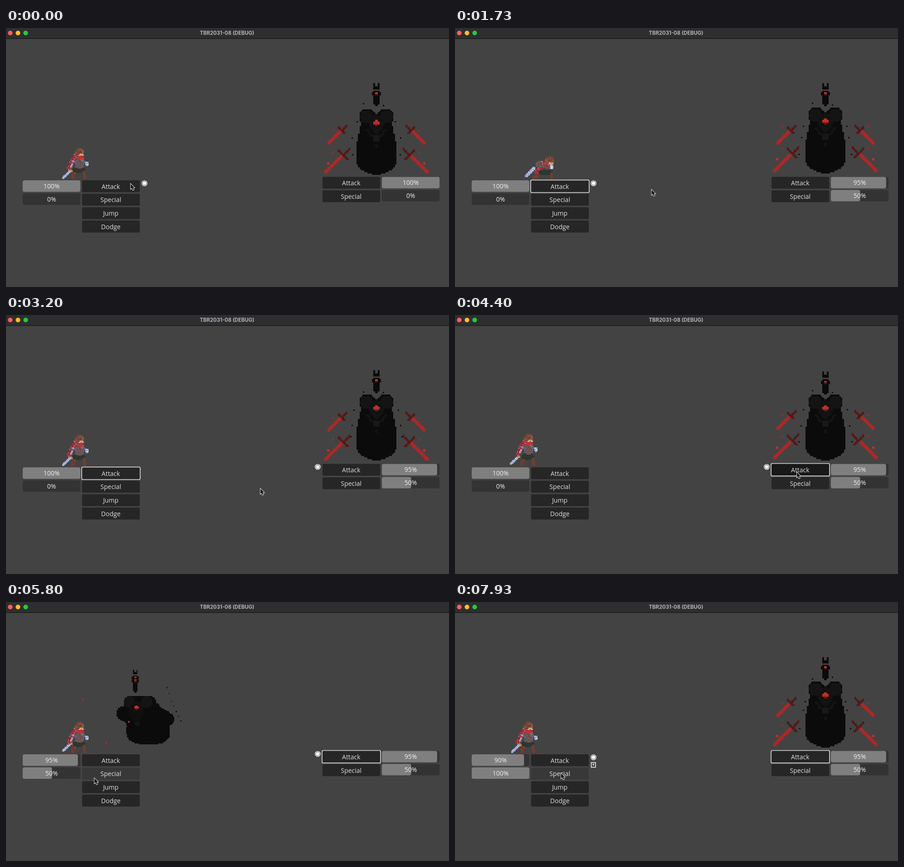
Recreate the animation shown at these times as an HTML page with a canvas. Size 977 by 573 pixels, loop 8 s.

```html
<!DOCTYPE html>
<html lang="en">
<head>
<meta charset="utf-8">
<title>Battle</title>
<style>
  html, body { margin: 0; width: 100%; height: 100%; overflow: hidden; background: #434343; }
  canvas { display: block; }
</style>
</head>
<body>
<canvas id="stage" width="977" height="573"></canvas>
<script>
const ctx = document.getElementById('stage').getContext('2d');
const LOOP = 8000, BIG = 3.39, SMALL = 2.54, AXIS = 817;
const BLACK = '#0b0b0b', COAL = '#141414', RED = '#ae2727', DARK_RED = '#551717', BRIGHT = '#c2302c';

const clamp = v => Math.max(0, Math.min(1, v));
const span = (t, from, to) => clamp((t - from) / (to - from));
const noise = (a, b = 0) => {
  const v = Math.sin(a * 127.1 + b * 311.7) * 43758.5453;
  return v - Math.floor(v);
};

// A small pixel canvas. A colour may list several tones, which are then mixed by noise.
class Sprite {
  constructor(x, y, cols, rows, px, paint) {
    Object.assign(this, { x, y, cols, rows, px });
    this.img = document.createElement('canvas');
    this.img.width = cols;
    this.img.height = rows;
    this.g = this.img.getContext('2d');
    paint(this);
  }
  fill(color, test) {
    const tones = color.split(' ');
    for (let r = 0; r < this.rows; r++) for (let c = 0; c < this.cols; c++) {
      if (!test(c + .5, r + .5)) continue;
      this.g.fillStyle = tones[Math.floor(noise(c, r) * tones.length)];
      this.g.fillRect(c, r, 1, 1);
    }
  }
  box(color, c, r, w = 1, h = 1) {
    this.fill(color, (x, y) => x > c && x < c + w && y > r && y < r + h);
  }
  disc(color, cx, cy, rx, ry = rx, power = 2) {
    this.fill(color, (x, y) => Math.abs((x - cx) / rx) ** power + Math.abs((y - cy) / ry) ** power < 1);
  }
  line(color, x0, y0, x1, y1, radius) {
    const dx = x1 - x0, dy = y1 - y0, len = dx * dx + dy * dy;
    this.fill(color, (x, y) => {
      const u = clamp(((x - x0) * dx + (y - y0) * dy) / len);
      return Math.hypot(x - x0 - u * dx, y - y0 - u * dy) < radius;
    });
  }
  draw(dx = 0, dy = 0) {
    ctx.imageSmoothingEnabled = false;
    ctx.drawImage(this.img, this.x + dx, this.y + dy, this.cols * this.px, this.rows * this.px);
  }
}

const bossPart = paint => new Sprite(AXIS - 35 * BIG, 122, 70, 60, BIG, paint);

function gem(s, center, row) {
  for (let i = 0; i < 4; i++) {
    const half = i === 1 || i === 2 ? 2 : 1;
    s.box([BRIGHT, BRIGHT, RED, DARK_RED][i], center - half, row + i, half * 2);
  }
}

// The same mask serves both poses: eared crown, narrow head, red visor.
function mask(s, c) {
  s.box(BLACK, c, 0, 1, 4);
  s.box(BLACK, c + 3, 0, 1, 4);
  s.box(BLACK, c, 2, 4, 2);
  s.box(BLACK, c, 5, 4, 9);
  s.box(BLACK, c - 1, 6, 6, 2);
  s.box(BLACK, c + 1, 14, 2);
  s.box(BRIGHT, c + 1, 6, 2);
  s.box(DARK_RED, c + 1, 7, 2);
}

const bossHead = bossPart(s => mask(s, 33));

const bossBody = bossPart(s => {
  s.fill(BLACK, (x, y) => {
    const belly = y > 50 ? Math.sqrt(Math.max(0, 1 - ((y - 50) / 9.8) ** 2)) : 1;
    return y > 20 && Math.abs(x - 35) < Math.min(13, 9 + (y - 20) * .2) * belly;
  });
  for (const side of [-1, 1]) {
    s.disc(BLACK, 35 + side * 6, 22, 5.3, 5.2);
    s.disc(COAL, 35 + side * 6.5, 22, 4.2, 4.2);
    s.line(COAL, 35 + side * 6, 30, 35 + side * 3, 35, .7);
  }
  s.fill(COAL + ' #101010', (x, y) => Math.abs(x - 35) / 5.5 + Math.abs(y - 27) / 8 < 1);
  s.disc('#181818', 35, 36, 2.3);
  s.box(COAL, 34, 40, 2, 2);
  gem(s, 35, 24);
});

// Diagonal swords on both sides: grip, crossguard, blade.
function swords(s, col, row, length) {
  const guard = Math.round(length / 4), arm = guard - 1;
  const pair = (color, c, r) => [c, 69 - c].forEach(x => s.box(color, x, r));
  for (let i = 0; i < length; i++) {
    const color = i > guard ? RED : DARK_RED;
    pair(color, col + i, row + i);
    pair(color, col + i, row + i + (i < length - 1 ? 1 : 0));
    if (i > guard) pair(color, col + i, row + i - 1);
  }
  for (let k = -arm; k <= arm; k++) {
    pair(DARK_RED, col + guard + k, row + guard - k);
    if (k < arm) pair(DARK_RED, col + guard + k + 1, row + guard - k);
  }
}
const upperSwords = bossPart(s => swords(s, 54, 27, 13));
const lowerSwords = bossPart(s => swords(s, 52, 42, 17));

const lungingBoss = new Sprite(241.9, 150, 60, 66, SMALL, s => {
  mask(s, 15);
  s.g.drawImage(s.img, 13, 5, 7, 10, 13, 7, 7, 13);
  s.line(BLACK, 13, 29, 29, 29, 6.5);
  s.line(BLACK, 7, 38, 26, 42, 6.5);
  s.line(BLACK, 32, 36, 45, 43, 6);
  s.disc(BLACK, 25, 42, 17);
  s.disc(BLACK, 28.3, 53, 19, 12, 2.8);
  s.disc(COAL, 12, 28, 5);
  s.disc(COAL, 27, 28, 5);
  s.disc('#111111 #0e0e0e', 18, 36, 6, 9);
  s.disc(COAL, 18.5, 47, 2.5);
  gem(s, 18, 31);
  for (let i = 0; i < 7; i++) s.box(BLACK, 44 + i * 2, 15 + Math.floor(i * 4.6 + noise(i) * 4));
});

const HAIR = '#74483a #8a5845 #6c4034', CAPE = '#a5303c #a5303c #8c2a38 #b8636c', STEEL = '#b4c0e2 #98a4d0 #aab6de',
      LEATHER = '#74402f #6a3a2c', CLOTH = '#6a6068 #75493c #5b5564', TROUSERS = '#2a322f #303834',
      HAND = '#aebed9 #dce8fa #8f9fbf', SKIN = '#dba27c';

const heroPart = paint => new Sprite(121.4, 262.9, 48, 28, SMALL, paint);

function face(s, x, y) {
  s.disc(HAIR, x, y, 4.2, 3.9);
  s.disc(SKIN, x + 1.7, y + 2.5, 2.2, 1.6);
  s.box('#3c8290', Math.floor(x + 1.5), Math.floor(y + 2));
}

const heroTop = heroPart(s => {
  s.line(CAPE, 12.5, 8, 9, 14, 1.9);
  s.line(CAPE, 9, 14, 6.5, 19, 1.7);
  s.line('#77707f #c9ccd8 #5b5564', 11, 13, 9, 17, 1);
  s.disc(CLOTH, 16, 14.5, 4.5, 4.8);
  s.line('#6f6f86 #5d5d72', 18, 12, 21.5, 14, 1.3);
  face(s, 16, 5);
  s.line('#b02f36 #c03a34', 15, 9.6, 18.5, 10, 1.5);
  s.disc(HAND, 22.6, 14.7, 1.9);
});
const heroLegs = heroPart(s => {
  s.disc(TROUSERS, 15.5, 20, 5.5, 3);
  s.line(LEATHER, 11.3, 23, 10.5, 27, 1.5);
  s.line(LEATHER, 19.8, 22.5, 20.8, 27, 1.4);
});
const heroSword = heroPart(s => {
  s.line(STEEL, 1.8, 27, 8.5, 20.5, 1.1);
  s.line('#b78542', 7.5, 19.5, 9.5, 21, .7);
});
const heroSlash = heroPart(s => s.line(STEEL, 24, 15, 33, 8, 1.2));

// Leaning pose, shared by the run out and the run home.
const heroLean = new Sprite(154.3, 284, 32, 20, SMALL, s => {
  s.line(STEEL, 1, 17.5, 8.5, 10, 1.1);
  s.line(CAPE, 10, 14, 17, 6, 2.1);
  s.line(CLOTH, 12, 7, 21, 8, 2.8);
  s.line(CAPE, 15, 5, 20, 8, 1.5);
  s.line(TROUSERS, 14, 14, 22, 14, 2);
  s.line(LEATHER, 12, 16, 8.5, 18.5, 1.5);
  s.line(LEATHER, 23, 15, 23, 18.5, 1.4);
  face(s, 21.5, 3.7);
  s.disc(HAND, 23.5, 9.7, 1.7);
});

function cell(color, x, y, size) {
  ctx.fillStyle = color;
  ctx.fillRect(Math.round(x - size / 2), Math.round(y - size / 2), Math.round(size), Math.round(size));
}

function idleBoss(t, dx) {
  const step = Math.floor((t >= 6900 ? t - 6380 : t) / 100) % 7, cx = AXIS + dx;
  const up = (first, last) => step >= first && step <= last ? -BIG : 0;
  upperSwords.draw(dx, up(1, 2));
  lowerSwords.draw(dx, up(1, 3));
  bossBody.draw(dx, up(1, 5));
  bossHead.draw(dx, -up(2, 2));
  for (const side of [-1, 1]) {
    for (let i = 0; i < 3; i++) {
      cell(BLACK, cx + side * (42 + i * 5 + noise(step, i) * 8), 208 + i * 30 + noise(i, step) * 16, BIG);
    }
    cell(BLACK, cx + side * 22 - 6, 166 + noise(step, side) * 7, BIG);
    cell(RED, cx + side * 95, 228 - step % 4 * 3, BIG);
    cell(RED, cx + side * 95, 276 - step % 4 * 3, BIG);
    cell(BRIGHT, cx + side * 106, 300 - step % 4 * 3, BIG * 1.5);
  }
}

function drawBoss(t) {
  if (t >= 5450 && t < 6950) return lungingBoss.draw();
  const away = t < 6000 ? span(t, 4980, 5450) : 1 - span(t, 6950, 7450);
  idleBoss(t, -530 * away ** 2);
}

function drawHero(t) {
  const reach = t < 1300 ? span(t, 150, 700) : 1 - span(t, 1300, 1850);
  const dx = 520 * reach ** 2;
  if (reach > 0 && reach < 1) return heroLean.draw(dx - 25);
  const step = Math.floor(t / 100) % 8;
  const lift = step > 2 && step < 6 ? -SMALL : 0;
  heroLegs.draw(dx);
  if (t > 850 && t < 1150) heroSlash.draw(dx);
  else heroSword.draw(dx + lift, step > 1 && step < 6 ? -SMALL : 0);
  heroTop.draw(dx, lift);
}

function drawHits(t) {
  for (const start of [5480, 6200]) {
    const u = (t - start) / 170, spread = (t - start - 170) / 150;
    if (u > 0 && u < 1) {
      for (let i = 0; i < 18; i++) {
        cell(i > 13 ? DARK_RED : RED, 235 - 75 * u + i * SMALL, 240 + 65 * u - i * SMALL, SMALL * 2.5);
      }
    }
    if (spread > 0 && spread < 2) {
      for (let i = 0; i < 3; i++) {
        cell('#a12c30', 170 + i * 50 * spread, 270 - Math.cos(i * 2.4) * 55 * spread, SMALL * 1.4);
      }
    }
  }
}

function panel(x, y, w, h, r, color) {
  ctx.fillStyle = color;
  ctx.beginPath();
  ctx.roundRect(x, y, w, h, r);
  ctx.fill();
}

function label(text, x, y, color = '#dfdfdf', font = '14px "Open Sans", sans-serif') {
  ctx.font = font;
  ctx.fillStyle = color;
  ctx.textAlign = 'center';
  ctx.fillText(text, x, y);
}

function button(text, x, y, { focus, hover, pressed }) {
  panel(x, y, 127.2, 26.3, 2.5, pressed ? '#191919' : hover ? '#383838' : '#262626');
  if (focus) {
    ctx.strokeStyle = '#d6d6d6';
    ctx.lineWidth = 1.7;
    ctx.beginPath();
    ctx.roundRect(x - .9, y - .7, 129, 27.7, 2.5);
    ctx.stroke();
  }
  label(text, x + 63.3, y + 18.7);
}

function bar(value, x, y) {
  panel(x, y, 127.2, 25.4, 4, '#333333');
  if (value) panel(x, y, 127.2 * value / 100 + (value < 100 ? 1 : 0), 25.4, 4, '#7f7f7f');
  label(value + '%', x + 63.6, y + 18, '#f0f0f0');
}

function turnIcon(x, y) {
  ctx.fillStyle = ctx.strokeStyle = '#fff';
  ctx.lineWidth = 1.3;
  ctx.beginPath();
  ctx.arc(x, y, 5.7, 0, 7);
  ctx.stroke();
  ctx.beginPath();
  ctx.arc(x, y, 4, 0, 7);
  ctx.fill();
}

function chargeIcon(x, y) {
  ctx.strokeStyle = ctx.fillStyle = '#fff';
  ctx.lineWidth = 1.5;
  ctx.strokeRect(x - 4.7, y - 5.2, 9.4, 10.4);
  ctx.fillRect(x - 1.5, y - 2.5, 3, 2);
  ctx.fillRect(x - .7, y - .5, 1.4, 2.2);
}

const stops = [
  { at: 0, x: 275, y: 345 }, { at: 1730, x: 433.5, y: 358 }, { at: 2350, x: 515, y: 403 },
  { at: 3200, x: 561, y: 384.5 }, { at: 4100, x: 754, y: 348 }, { at: 4900, x: 754, y: 348 },
  { at: 5800, x: 195, y: 390 }, { at: 6100, x: 205, y: 408 }, { at: 6600, x: 232, y: 381 },
  { at: 7250, x: 238, y: 422 }, { at: 7750, x: 234, y: 379 }, { at: LOOP, x: 234, y: 379 }
];
function pointerAt(t) {
  const i = stops.findIndex(stop => stop.at > t), a = stops[i - 1], b = stops[i];
  const u = span(t, a.at, b.at);
  return { x: a.x + (b.x - a.x) * u, y: a.y + (b.y - a.y) * u };
}

const arrow = new Path2D('M0 0V11.3L2.6 9L4.5 13.6L6.7 12.7L4.8 8.2H8Z');
function drawPointer({ x, y }) {
  ctx.save();
  ctx.translate(x, y);
  ctx.strokeStyle = '#f2f2f2';
  ctx.lineWidth = 1.8;
  ctx.stroke(arrow);
  ctx.fillStyle = '#111';
  ctx.fill(arrow);
  ctx.restore();
}

function drawInterface(t, pointer) {
  const over = (x, y) => pointer.x > x && pointer.x < x + 127 && pointer.y > y && pointer.y < y + 26;
  const heroHits = (t >= 5620) + (t >= 6350), bossHits = +(t >= 1000);
  const bossChosen = t >= 4390, heroTurn = t < 1870 || t >= 6900;

  ['Attack', 'Special', 'Jump', 'Dodge'].forEach((name, i) => {
    const y = 337 + i * 29.7;
    button(name, 167.8, y, { focus: !i && t >= 70 && !bossChosen, hover: t > 5000 && over(168, y) });
  });
  ['Attack', 'Special'].forEach((name, i) => {
    const y = 329.2 + i * 29.7;
    button(name, 698, y, {
      focus: !i && bossChosen, hover: t > 3200 && over(698, y), pressed: !i && bossChosen && t < 4520
    });
  });
  for (const [hits, x, y] of [[heroHits, 36.8, 337], [bossHits, 829, 329.4]]) {
    bar(100 - hits * 5, x, y);
    bar(hits * 50, x, y + 28.8);
  }

  if (heroTurn) turnIcon(305.5, 343.5);
  else turnIcon(687.5, 336);
  if (heroHits === 2) chargeIcon(305.2, heroTurn ? 360.4 : 343.5);
}

function drawWindow() {
  ctx.fillStyle = '#434343';
  ctx.fillRect(0, 0, 977, 573);
  ctx.fillStyle = '#2e2e31';
  ctx.fillRect(0, 0, 977, 23);
  ctx.fillStyle = '#0d0d0d';
  ctx.fillRect(0, 23, 977, 1);
  ['#ff5f57', '#febc2e', '#28c840'].forEach((color, i) => panel(4.3 + i * 17, 6, 10.2, 10.2, 5.1, color));
  label('TBR2031-08 (DEBUG)', 487.5, 14.8, '#b4b4b5', 'bold 11.3px Inter, sans-serif');
}

function render() {
  const t = performance.now() % LOOP, pointer = pointerAt(t);
  drawWindow();
  drawBoss(t);
  drawHero(t);
  drawHits(t);
  drawInterface(t, pointer);
  drawPointer(pointer);
  requestAnimationFrame(render);
}
render();
</script>
</body>
</html>
```
